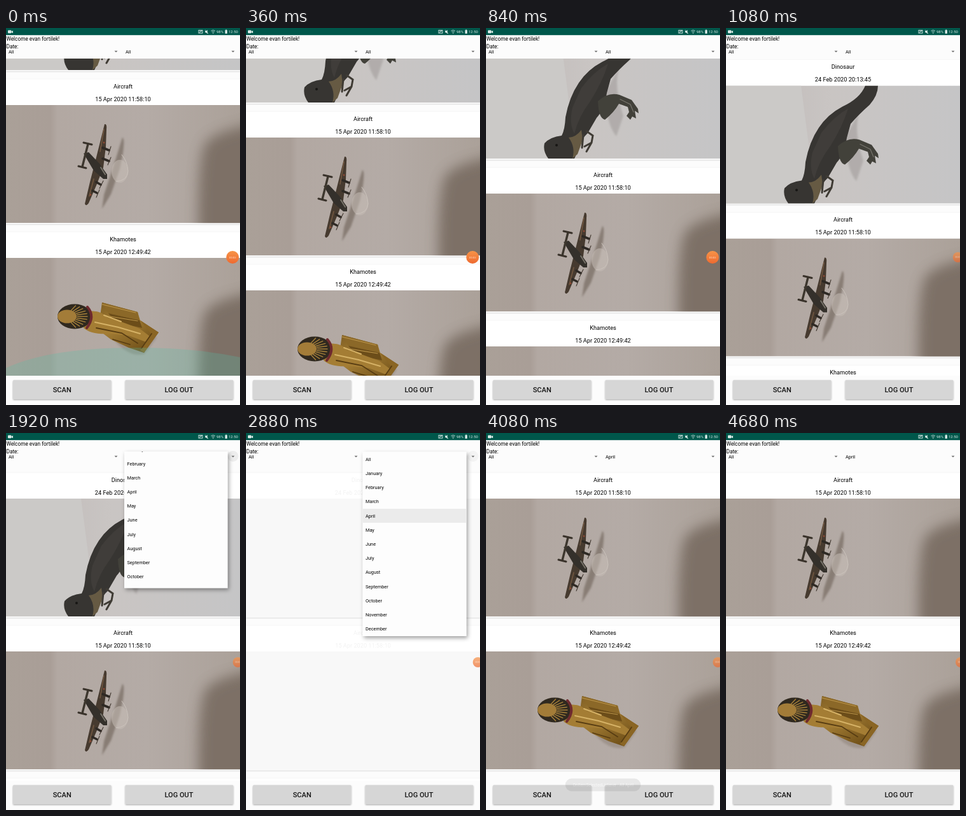
Write an HTML page that moves like this. It is 368 by 592 pixels and loops after 4.8 s.

```html
<!DOCTYPE html>
<html lang="en">
<head>
<meta charset="utf-8">
<title>Collection list</title>
<style>
html, body { margin: 0; width: 100%; height: 100%; overflow: hidden; background: #fcfcfc; }
#stage { display: block; width: 368px; height: 592px; font-family: Roboto, "Liberation Sans", sans-serif; }
.title { font-size: 9.2px; text-anchor: middle; }
.label { font-size: 8.28px; }
.item { font-size: 7.36px; }
.button { font-size: 11.04px; font-weight: 500; text-anchor: middle; fill: #161616; }
.status { font-size: 6px; fill: #dcebe8; }
</style>
</head>
<body>
<svg id="stage" viewBox="0 0 368 592">
  <defs>
    <filter id="soft" x="-40%" y="-40%" width="180%" height="180%"><feGaussianBlur stdDeviation="10"/></filter>
    <filter id="blur" x="-30%" y="-30%" width="160%" height="160%"><feGaussianBlur stdDeviation="1.6"/></filter>
    <filter id="lift" x="-10%" y="-10%" width="120%" height="120%">
      <feDropShadow dx="2" dy="3" stdDeviation="3" flood-opacity=".38"/>
    </filter>
    <filter id="edge" x="-5%" y="-20%" width="110%" height="150%">
      <feDropShadow dx="0" dy="1.2" stdDeviation="1" flood-opacity=".36"/>
    </filter>
    <linearGradient id="wall">
      <stop offset="0" stop-color="#aaa098"/><stop offset=".19" stop-color="#a99e97"/>
      <stop offset=".22" stop-color="#b2a8a2"/><stop offset=".6" stop-color="#b4aba6"/>
      <stop offset="1" stop-color="#aba199"/>
    </linearGradient>
    <linearGradient id="pale">
      <stop offset="0" stop-color="#bdb6b5"/><stop offset=".45" stop-color="#c9c5c3"/>
      <stop offset="1" stop-color="#c5c5c6"/>
    </linearGradient>
    <linearGradient id="gold" x2=".7" y2="1">
      <stop offset="0" stop-color="#7e5d22"/><stop offset=".45" stop-color="#a47e35"/>
      <stop offset="1" stop-color="#6f4f18"/>
    </linearGradient>
    <linearGradient id="orange" x2="0" y2="1">
      <stop offset="0" stop-color="#f79448"/><stop offset="1" stop-color="#ee6a30"/>
    </linearGradient>
  </defs>

  <rect width="368" height="592" fill="#fcfcfc"/>
  <svg y="48" width="368" height="498" viewBox="0 48 368 498">
    <g id="list"></g>
    <path id="glow" d="M0 534Q60 506 170 502.500T368 517V546H0Z" fill="#4fc0a8"/>
  </svg>

  <rect width="368" height="11.200" fill="#00574b"/>
  <g id="status" fill="#dcebe8">
    <rect x="3" y="3.500" width="5.500" height="4.800" rx="1"/>
    <path d="M8.300 5.800L11 4v4.200L8.300 6.600Z"/>
    <rect x="303" y="3.500" width="6" height="4.600" fill="none" stroke="#dcebe8" stroke-width=".9"/>
    <path d="M304 7l4-2.500M304.500 5h3" stroke="#dcebe8" stroke-width=".8"/>
    <path d="M313 5h1.500l2.200-2v6l-2.200-2H313Z"/>
    <path d="M313 3l5 6M322.500 4.600q3.200-2.600 6.400 0M323.700 6.300q2-1.500 4 0" fill="none" stroke="#dcebe8" stroke-width=".8"/>
    <circle cx="325.700" cy="8" r=".8"/>
    <text class="status" x="331" y="8.200">98%</text>
    <rect x="344.500" y="3.300" width="3.400" height="5.500"/><rect x="345.500" y="2.500" width="1.500" height="1"/>
    <text class="status" x="350" y="8.200">12:50</text>
  </g>

  <text class="label" x=".5" y="20.400">Welcome evan fortilek!</text>
  <text class="label" x=".5" y="31.700">Date:</text>
  <text class="item" x="4" y="39.500">All</text>
  <text class="item" id="month" x="188" y="39.500">All</text>
  <circle id="ripple" cx="357" cy="36.500" r="8.500" fill="#e9e9e9"/>
  <path d="M170.500 35.700h5l-2.500 2.600ZM354.500 35.700h5l-2.500 2.600Z" fill="#707070"/>

  <g filter="url(#edge)" fill="#d6d6d6">
    <rect x="11" y="552.700" width="154.500" height="30" rx="1.500"/>
    <rect x="187.500" y="552.700" width="170" height="30" rx="1.500"/>
  </g>
  <text class="button" x="88.200" y="572">SCAN</text>
  <text class="button" x="272" y="572">LOG OUT</text>

  <g id="popup">
    <rect id="panel" fill="#fdfdfd" filter="url(#lift)"/>
    <svg id="menu"><g id="months">
      <rect id="pick" y="89.500" width="163" height="22" fill="#ebebeb"/>
    </g></svg>
  </g>

  <g id="toast">
    <rect x="124.700" y="542.500" width="118.600" height="20" rx="10" fill="#5d5d5d"/>
    <text x="184.300" y="554.700" font-size="6.440" text-anchor="middle" fill="#f2f2f2">OnItemSelectedListener : All April</text>
  </g>

  <g id="timer">
    <circle r="10" fill="url(#orange)"/>
    <text y="1.600" font-size="4.200" text-anchor="middle" fill="#ffe3cf">00:03</text>
  </g>
</svg>

<script>
const $ = id => document.getElementById(id);
const LOOP = 4800, TICK = 120;

const shape = (d, fill, extra = '') => `<path d="${d}" fill="${fill}" ${extra}/>`;
const line = (d, color, width) =>
  `<path d="${d}" fill="none" stroke="${color}" stroke-width="${width}" stroke-linecap="round"/>`;

const room = drop => '<rect width="368" height="185" fill="url(#wall)"/>' +
  shape('M304 240Q299 105 311 66Q320 38 420 26V240Z', '#75685d',
    `filter="url(#soft)" opacity=".85" transform="translate(0 ${drop})"`);

function dinosaur() {
  return '<rect width="368" height="185" fill="url(#pale)"/>' +
    shape('M0 0H118L131 100L124 185H0Z', '#cbc9c7') +
    shape('M216 30Q196 58 216 118L205 150Q188 130 188 80Z', '#a5a09f', 'filter="url(#blur)" opacity=".65"') +
    shape('M219 0H239Q239 15 226 30Q209 45 196 60L190 82Q186 108 174 121L160 145Q150 154 147 168L139 185H98Q89 173 92 161Q101 151 119 149Q124 140 125 120Q131 88 146 66Q160 45 183 33Q211 20 219 0Z', '#373532') +
    shape('M150 74Q170 48 192 36Q183 65 164 95Q145 120 139 146Q130 130 136 105Z', '#464340', 'opacity=".6"') +
    shape('M130 152Q141 152 150 140L152 156L144 178L136 185Q141 167 130 152Z', '#665a43') +
    shape('M176 95Q192 80 210 85L229 93L239 107L240 114L234 110L236 122L230 119L227 124L221 118L225 112L223 104L209 99Q201 113 187 124Q177 122 176 95Z', '#42413a') +
    line('M158 142L168 149L166 160L155 166M166 160L158 174M153 148L151 168', '#3f3b34', 3) +
    line('M211 92L227 100L232 112', '#77756d', 1.2) +
    '<circle cx="111" cy="164" r="2" fill="#171614"/>';
}

function aircraft() {
  return room(0) +
    shape('M183 51Q187 52 184 75L179 100L165 140L151 163L154 141L169 96Z', '#81766d', 'filter="url(#blur)" opacity=".85"') +
    '<ellipse cx="179" cy="104" rx="13" ry="18" fill="#c6beb7" opacity=".55"/>' +
    line('M173 120Q191 119 192 104Q191 88 182 78', '#cbc3bc', 1) +
    shape('M155 30Q159 29 158 38L157 66L153 98L143 124L130 154Q126 160 124 155L132 121L142 82L150 50Z', '#463a2f') +
    shape('M122 76L130 74L147 92L159 109L159 116L153 116L138 103Z', '#34302b') +
    line('M129 61L120 97', '#3d372e', 3.4) +
    line('M122 59L135 62M114 96L126 99', '#39322a', 3) +
    line('M152 67L162 71M152 84L162 88M142 121L149 125M135 134L143 138', '#2e2924', 3.6) +
    line('M165 65L161 78M165 82L160 94M153 119L147 131M147 133L142 145', '#40372f', 1.1) +
    line('M154 38L148 73M138 116L131 143', '#735841', 1.5) +
    line('M149 98L156 109', '#777268', 2) +
    '<circle cx="154" cy="59" r="1.4" fill="#8d4a35"/><circle cx="133" cy="141" r="1.4" fill="#8d4a35"/>';
}

function statue() {
  let stripes = '';
  for (let i = -5; i <= 5; i++) {
    const x = Math.cos(i / 4), y = Math.sin(i / 4);
    stripes += line(`M${98 + 14 * x} ${92 + 10 * y}L${101 + 27 * x} ${92 + 18 * y}`, '#a5803a', 1.4);
  }
  return room(24) +
    shape('M146 90Q180 160 218 151L237 125L222 114Z', '#877a70', 'filter="url(#blur)" opacity=".45"') +
    shape('M151 70L207 85L211 98L240 117L217 149L193 141L165 128L145 113Z', 'url(#gold)') +
    shape('M151 70L207 85L210 98L161 87Z', '#8b6828') +
    shape('M161 87L210 98L214 110L172 101Z', '#6c4d19') +
    shape('M211 98L240 117L217 149L211 145L228 119Z', '#8a6524') +
    shape('M128 84Q150 81 159 94L178 99L210 111L226 123L220 132L193 122L164 119Q134 121 122 110Z', '#a47d34') +
    '<ellipse cx="108" cy="92" rx="27" ry="19.500" fill="#30291f"/>' +
    stripes +
    '<ellipse cx="96" cy="92" rx="15" ry="10.500" fill="#a37c38"/>' +
    line('M128 77Q141 92 127 110', '#6f2a2e', 4) +
    line('M140 101L177 109L211 119M154 90L181 100', '#d6b266', 2) +
    line('M142 110L182 118L207 134M168 128L195 136M213 142L229 119', '#573c12', 1.8) +
    line('M151 73L204 86M164 92L207 99', '#bc954a', 1.2);
}

const cards = {
  dinosaur: ['Dinosaur', '24 Feb 2020 20:13:45', dinosaur()],
  aircraft: ['Aircraft', '15 Apr 2020 11:58:10', aircraft()],
  statue: ['Khamotes', '15 Apr 2020 12:49:42', statue()]
};

function card(key, i) {
  const [name, date, photo] = cards[key];
  return `<g transform="translate(0 ${i * 240})">
    <rect y="62.500" width="368" height="226" fill="#fff" filter="url(#edge)"/>
    <g class="text"><text class="title" x="184" y="76.700">${name}</text>
    <text class="title" x="184" y="96.800">${date}</text></g>
    <rect y="103" width="368" height="187" fill="#f8f8f8"/>
    <svg class="photo" y="103" width="368" height="185.300">${photo}</svg></g>`;
}

$('list').innerHTML =
  `<g id="all">${['dinosaur', 'aircraft', 'statue'].map(card).join('')}</g>` +
  `<g id="april">${['aircraft', 'statue'].map(card).join('')}</g>`;

$('months').insertAdjacentHTML('beforeend',
  'All January February March April May June July August September October November December'
    .split(' ').map((m, i) => `<text class="item" x="4.500" y="${14.2 + i * 22.2}">${m}</text>`).join(''));

// Each track lists [time, value] pairs that hold until the next pair.
const tracks = {
  scroll: [[0, 222], [120, 211], [240, 193], [360, 171], [480, 151], [600, 137.5],
    [720, 114], [840, 83], [960, 47], [1080, 12.5], [1200, 0]],
  glow: [[0, .25], [120, .16], [240, .08], [360, 0]],
  ripple: [[0, 0], [1440, .8], [2040, .5], [3000, 0]],
  popup: [[0, 0], [1920, 1], [3000, .4], [3120, 0]],
  toast: [[0, 0], [3120, .25], [3240, .55], [3360, .85], [3480, 1],
    [3720, .85], [3840, .6], [3960, .35], [4080, .12], [4200, 0]],
  timerX: [[0, 356.3], [1080, 364.7], [4320, 366], [4440, 367.5], [4560, 369]],
  timerFade: [[0, 1], [1080, .7]]
};
const at = (name, t) => tracks[name].findLast(step => step[0] <= t)[1];
const set = (el, attrs) => { for (const k in attrs) el.setAttribute(k, attrs[k]); };
const fade = (id, value) => set($(id), { opacity: value });
const show = (id, on) => set($(id), { display: on ? 'inline' : 'none' });

function draw(t) {
  const filtered = t >= 3120, blank = t >= 2760 && t < 3120, opening = t < 2040;
  set($('list'), { transform: `translate(0 ${-at('scroll', t)})` });
  show('all', !filtered);
  show('april', filtered);
  document.querySelectorAll('#all .photo').forEach(p => set(p, { display: blank ? 'none' : 'inline' }));
  document.querySelectorAll('#all .text').forEach(p => set(p, { opacity: blank ? .05 : 1 }));
  $('month').textContent = filtered ? 'April' : 'All';

  const box = opening
    ? { x: 186, y: 29, width: 162.5, height: 214.5 }
    : { x: 183.5, y: 29.5, width: 163, height: 289.5 };
  set($('panel'), box);
  set($('menu'), box);
  set($('months'), { transform: `translate(0 ${opening ? -37 : 0})` });
  show('pick', t >= 2640);

  ['glow', 'ripple', 'popup', 'toast'].forEach(id => fade(id, at(id, t)));
  const x = at('timerX', t);
  set($('timer'), { transform: `translate(${x} 360) scale(${x > 360 ? .8 : 1})`, opacity: at('timerFade', t) });
}

let last = -1;
const start = performance.now();
function frame() {
  const t = Math.floor(((performance.now() - start) % LOOP) / TICK) * TICK;
  if (t !== last) draw(last = t);
  requestAnimationFrame(frame);
}
frame();
</script>
</body>
</html>
```
